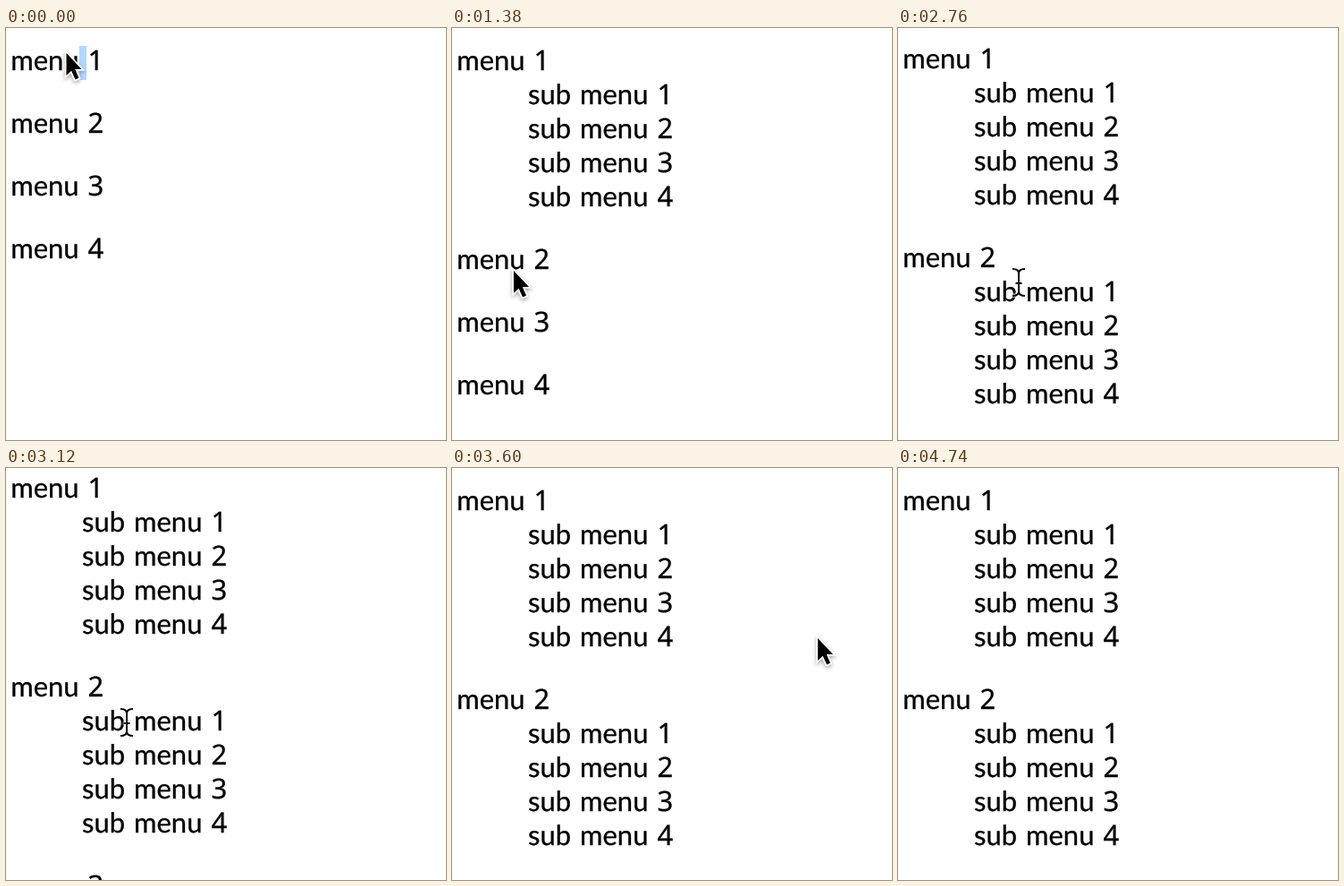
An HTML page that plays this animation: 492 px wide and 460 px high, repeating every 4.8 s.

```html
<!DOCTYPE html>
<html lang="en">
<head>
<meta charset="utf-8">
<title>Menu</title>
<style>
html, body { margin: 0; width: 100%; height: 100%; overflow: hidden; background: #fff; }
svg { display: block; }
text {
  font: 31px Lato, sans-serif; word-spacing: 2px;
  text-rendering: geometricPrecision; stroke: #000; stroke-width: .3px;
}
.digit { font-family: "Noto Sans", sans-serif; }
#arrow { filter: drop-shadow(0 2px 2px rgba(0, 0, 0, .35)); }
#beam { filter: drop-shadow(0 0 1px #fff) drop-shadow(0 0 1px #fff); }
</style>
</head>
<body>
<svg width="492" height="460" viewBox="0 0 492 460">
  <rect id="mark" x="82" y="20" width="8" height="38" fill="#b3d7ff"/>
  <g id="page"></g>
  <path id="arrow" d="M0 0V25L5.6 19.7L10 29.5L14 27.8L9.8 18H17Z"
        stroke="#fff" stroke-width="3.4" paint-order="stroke"/>
  <path id="beam" d="M-7-15Q0-15 0-10Q0-15 7-15M0-10V10M-7 15Q0 15 0 10Q0 15 7 15M-3.5 1H3.5"
        fill="none" stroke="#000" stroke-width="2"/>
</svg>
<script>
const LOOP = 4800, TICK = 60, LINE = 38, GAP = 70;
const $ = id => document.getElementById(id);
const page = $('page');

function add(parent, tag, attrs = {}, label = '') {
  const el = document.createElementNS('http://www.w3.org/2000/svg', tag);
  for (const key in attrs) el.setAttribute(key, attrs[key]);
  el.textContent = label;
  return parent.appendChild(el);
}

function addItem(parent, x, y, label, n) {
  const item = add(parent, 'text', { x, y }, label + ' ');
  add(item, 'tspan', { class: 'digit' }, n);
}

const menus = [1, 2, 3, 4].map(n => {
  const box = add(page, 'g');
  addItem(box, 5.2, 47, 'menu', n);
  const sub = add(box, 'g');
  for (let i = 1; i < 5; i++) addItem(sub, 85, 47 + i * LINE, 'sub menu', i);
  return { box, sub };
});
const openAt = [600, 2040];

// Pointer moves: from when, until when, to where, sideways bow
const home = { x: 67.5, y: 28 };
const moves = [
  { from: 60, to: 480, x: 74.5, y: 33 },
  { from: 840, to: 1380, x: 69, y: 271, bow: 15 },
  { from: 1380, to: 1560, x: 69, y: 249 },
  { from: 1980, to: 2220, x: 83, y: 266 },
  { from: 2400, to: 2580, x: 135, y: 284 },
  { from: 3300, to: 3600, x: 409, y: 190 },
  { from: 3600, to: 3720, x: 372, y: 401 },
  { from: 3900, to: 3960, x: 374, y: 436 },
  { from: 4020, to: 4380, x: 392, y: 367 },
  { from: 4380, to: 4440, x: 399, y: 346 },
  { from: 4620, to: 4680, x: 360, y: 364 }
];

const clamp = v => Math.max(0, Math.min(1, v));
const place = (el, x, y) => el.setAttribute('transform', `translate(${x} ${y})`);
const show = (el, on) => el.setAttribute('visibility', on ? 'visible' : 'hidden');

function pointerAt(t) {
  let { x, y } = home;
  for (const m of moves) {
    const f = clamp((t - m.from) / (m.to - m.from));
    x += (m.x - x) * f + (m.bow || 0) * Math.sin(Math.PI * f);
    y += (m.y - y) * f;
  }
  return [x, y];
}

// The page is pulled up slowly and springs back
const scrollAt = t => Math.round(14 * clamp(Math.min((t - 2700) / 420, (3300 - t) / 180)));

function draw(now) {
  const t = Math.floor(now % LOOP / TICK) * TICK;
  show($('mark'), t < 120);

  let y = 0;
  menus.forEach((m, i) => {
    const open = t >= openAt[i];
    place(m.box, 0, y);
    show(m.sub, open);
    y += GAP + (open ? 4 * LINE : 0);
  });
  place(page, 0, -scrollAt(t));

  const typing = t >= 2580 && t < 3360;
  const away = t >= 4020 && t < 4380 || t >= 4740;
  for (const id of ['arrow', 'beam']) place($(id), ...pointerAt(t));
  show($('arrow'), !typing && !away);
  show($('beam'), typing);
}

const start = performance.now();
function frame() {
  draw(performance.now() - start);
  requestAnimationFrame(frame);
}
frame();
</script>
</body>
</html>
```
